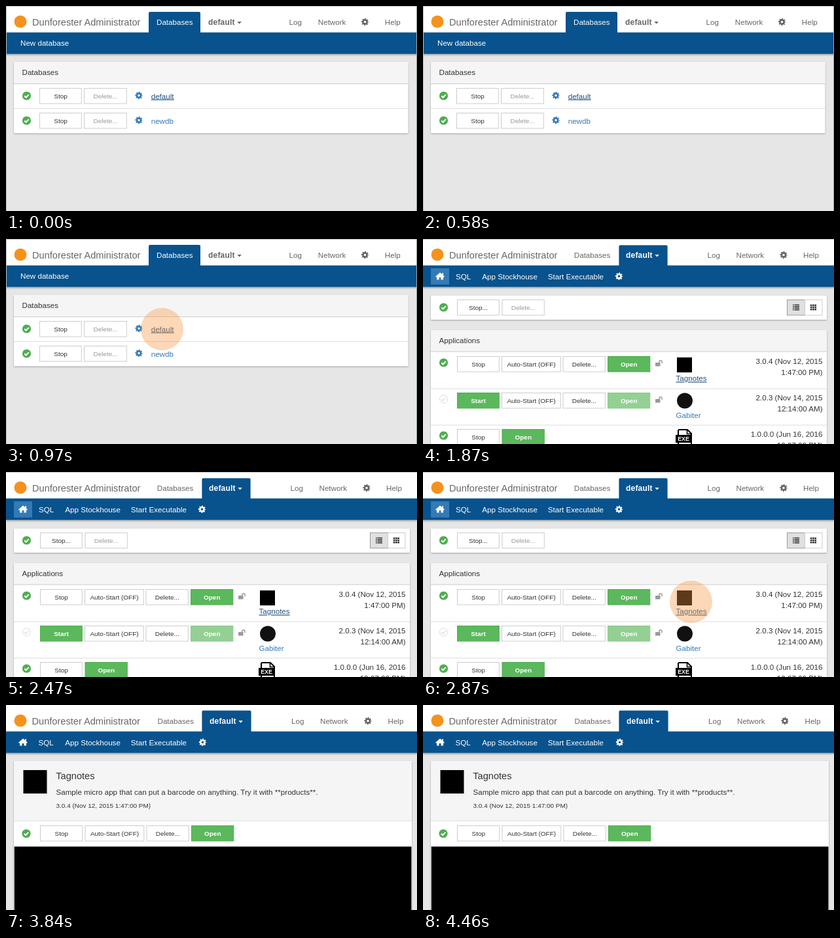
Write an HTML page that moves like this. It is 628x315 px and loops after 4.87 s.

```html
<!DOCTYPE html>
<html lang="en">
<head>
<meta charset="utf-8">
<title>Database administration</title>
<style>
html, body { margin: 0; width: 100%; height: 100%; overflow: hidden; background: #e6e6e6; }
svg { display: block; width: 628px; height: 315px; }
text { font-family: "Liberation Sans", Arial, sans-serif; font-size: 11.62px; fill: #333; white-space: pre; }
.title { font-size: 14.6px; fill: #666; }
.nav { fill: #666; }
.bold { font-size: 12px; font-weight: bold; letter-spacing: .2px; }
.white { fill: #fff; }
.small { font-size: 9.97px; }
.strong { font-weight: bold; }
.head { font-size: 14.6px; }
.link { fill: #337ab7; }
.hover { fill: #23527c; text-decoration: underline; }
.panel { filter: drop-shadow(0 1px 1px rgba(0, 0, 0, .3)); }
.bar { filter: drop-shadow(0 2px .8px rgba(0, 0, 0, .25)); }
</style>
</head>
<body>
<svg id="stage" viewBox="0 0 628 315"></svg>
<script>
const BLUE = '#08528d', GREEN = '#5cb85c', LINE = '#ddd';

const rect = (x, y, w, h, fill, extra = '') =>
  `<rect x="${x}" y="${y}" width="${w}" height="${h}" fill="${fill}" ${extra}/>`;
const circle = (x, y, r, fill, extra = '') =>
  `<circle cx="${x}" cy="${y}" r="${r}" fill="${fill}" ${extra}/>`;
const path = (d, fill, extra = '') => `<path d="${d}" fill="${fill}" ${extra}/>`;
const text = (x, y, str, cls = '', extra = '') =>
  `<text x="${x}" y="${y}" class="${cls}" ${extra}>${str}</text>`;
const panel = (x, y, w, h) => rect(x, y, w, h, '#fff', 'rx="1" class="panel"');

function gear(x, y, color) {
  const tooth = 2 * Math.PI * 4.7 / 16;
  return circle(x, y, 3.1, 'none', `stroke="${color}" stroke-width="2.6"`) +
    circle(x, y, 4.7, 'none', `stroke="${color}" stroke-width="2" stroke-dasharray="${tooth}" stroke-dashoffset="${tooth / 2}"`);
}

function check(x, y, on = true) {
  const tick = path(`M${x - 3.2} ${y + .2}l2.3 2.3l4.2 -4.4`, 'none', `stroke="${on ? '#fff' : '#ddd'}" stroke-width="${on ? 2 : 1.4}"`);
  return (on ? circle(x, y, 6.6, '#4fae50') : circle(x, y, 6, '#fff', 'stroke="#ddd"')) + tick;
}

function button(x, y, w, label, kind = '') {
  const green = kind.includes('green'), off = kind.includes('off');
  const fill = green ? GREEN : '#fff', edge = green ? '#4cae4c' : '#ccc';
  const color = green ? '#fff' : off ? '#999' : '#333';
  return rect(x + .5, y + .5, w - 1.2, 23.5, fill, `stroke="${edge}" opacity="${off && green ? .65 : 1}"`) +
    text(x + w / 2, y + 15.8, label, green ? 'small strong' : 'small', `text-anchor="middle" style="fill:${color}"`);
}

const home = (x, y) =>
  path(`M${x - 7} ${y + .6}L${x} ${y - 5.8}L${x + 3.2} ${y - 2.9}V${y - 5}H${x + 5}V${y - 1.2}L${x + 7} ${y + .6}L${x + 6} ${y + 1.6}L${x + 5} ${y + .8}V${y + 5.4}H${x + 1.5}V${y + 1.8}H${x - 1.5}V${y + 5.4}H${x - 5}V${y + .8}L${x - 6} ${y + 1.6}Z`, '#fff');

const lock = (x, y) => rect(x - 5, y - .5, 7.5, 5.5, '#999', 'rx=".6"') +
  path(`M${x + .8} ${y}V${y - 1.6}a2.1 2.1 0 0 1 4.2 0V${y + .8}`, 'none', 'stroke="#999" stroke-width="1.4"');

const caret = (x, color) => path(`M${x} 24h6.6l-3.3 3.5z`, color);

// Top bar: tab is [x, y, width], right holds the x of the right-hand items
function header(titleX, tab, dbX, defX, onDb, right) {
  const [tabX, tabY, tabW] = tab;
  const [log, net, cog, help] = right;
  return rect(0, 0, 628, 315, '#e6e6e6') + rect(0, 0, 628, 42, '#fff') +
    circle(22, 24, 9.5, '#f5921e') +
    text(titleX, 29.7, 'Dunforester Administrator', 'title') +
    rect(0, 40.6, 628, 33, BLUE, 'class="bar"') +
    path(`M${tabX} 42V${tabY + 2}q0 -2 2 -2h${tabW - 4}q2 0 2 2V42z`, BLUE) +
    text(dbX, 28.8, 'Databases', onDb ? 'white' : 'nav') +
    text(defX, 28.8, 'default', onDb ? 'bold nav' : 'bold white') +
    caret(defX + 44.3, onDb ? '#666' : '#fff') +
    text(log, 28.8, 'Log', 'nav') + text(net, 28.8, 'Network', 'nav') +
    gear(cog, 24.5, '#666') + text(help, 28.8, 'Help', 'nav');
}

const topLine = rect(0, 0, 628, 1, '#c4c4c4');

const menu = (sqlX, cogX) => home(26, 57.2) + text(sqlX, 61.6, 'SQL', 'white') +
  text(90.3, 61.6, 'App Stockhouse', 'white') +
  text(190.8, 61.6, 'Start Executable', 'white') + gear(cogX, 57.3, '#fff');

function databases() {
  const row = (y, name, cls) => check(31.5, y) + button(51, y - 12, 65, 'Stop') +
    button(119, y - 12, 66, 'Delete...', 'off') + gear(203, y - .5, '#337ab7') +
    text(221.7, y + 4.5, name, cls);
  return header(40, [218, 9, 79], 230, 309, true, [432.5, 476.8, 548.5, 578.8]) + topLine +
    text(22, 61.4, 'New database', 'white') +
    panel(12, 86, 602.5, 109.5) + rect(12, 86, 602.5, 33, '#f5f5f5') +
    rect(12, 119, 602.5, 1, '#ccc') + rect(12, 157, 602.5, 1, LINE) +
    text(24.5, 106.2, 'Databases') +
    row(138, 'default', 'hover') + row(176, 'newdb', 'link') +
    rect(0, 0, 1, 315, '#b9c2c2') + rect(627, 0, 1, 315, '#93aaa2');
}

function listToggle() {
  let out = rect(556.5, 93.5, 27, 23.5, '#e0e0e0', 'stroke="#999"') +
    rect(583.5, 93.5, 26.5, 23.5, '#fff', 'stroke="#ccc"');
  for (let i = 0; i < 4; i++) {
    const y = 100.6 + i * 2.5;
    out += rect(565, y, 1.6, 1.5, '#333') + rect(567.5, y, 7.5, 1.5, '#333');
  }
  for (let i = 0; i < 9; i++)
    out += rect(591.8 + i % 3 * 3.3, 100.6 + Math.floor(i / 3) * 3.2, 2.6, 2.5, '#333');
  return out;
}

function applications() {
  const stamp = (y, a, b) => [a, b].map((s, i) =>
    text(610.5, y + i * 16.6, s, '', 'text-anchor="end"')).join('');
  const row = (y, on) => check(31.5, y + 10, on) +
    button(52, y, 65, on ? 'Stop' : 'Start', on ? '' : 'green') +
    button(120, y, 91, 'Auto-Start (OFF)') + button(213.5, y, 65.5, 'Delete...') +
    button(282, y, 65.5, 'Open', on ? 'green' : 'green off') + lock(360, y + 10.5);
  const exe = path('M390 316V294.5q0 -1.5 1.5 -1.5H404l6 6V316', '#fff', 'stroke="#000" stroke-width="2"') +
    path('M403.5 293v6.5H410', 'none', 'stroke="#000" stroke-width="1.6"') +
    rect(386, 301, 24, 12, '#000') +
    text(398, 310.2, 'EXE', 'strong', 'text-anchor="middle" style="font-size:8.8px;fill:#fff"');
  return header(40, [299.4, 9.4, 74.2], 230.8, 310, false, [434.5, 478.5, 551, 581]) + topLine +
    rect(12, 45, 28, 25, '#337ab7') + menu(50, 299.5) +
    panel(12, 87, 605, 37) + check(31.5, 105) +
    button(52, 93, 65, 'Stop...') + button(120.5, 93, 65.5, 'Delete...', 'off') + listToggle() +
    panel(12, 140, 605, 190) + rect(12, 140, 605, 33, '#f5f5f5') +
    [172.5, 229.5, 285.5].map((y, i) => rect(12, y, 605, 1, i ? LINE : '#ccc')).join('') +
    text(24.5, 160.4, 'Applications') +
    row(180, true) + rect(388, 182, 23, 23, '#000') +
    text(386.5, 218.3, 'Tagnotes', 'hover') + stamp(192.2, '3.0.4 (Nov 12, 2015', '1:47:00 PM)') +
    row(236, false) + circle(400, 248.5, 12, '#111') +
    text(386.5, 274.5, 'Gabiter', 'link') + stamp(248.2, '2.0.3 (Nov 14, 2015', '12:14:00 AM)') +
    check(31.5, 302) + button(52, 292, 65, 'Stop') + button(120.5, 292, 65.5, 'Open', 'green') +
    exe + stamp(304.4, '1.0.0.0 (Jun 16, 2016', '10:07:00 PM)');
}

function details() {
  return header(39.5, [299.4, 8.4, 75.2], 231.5, 311, false, [436, 480, 553, 583.5]) + menu(49.5, 300.5) +
    panel(12, 86, 608, 240) + rect(12, 86, 608, 92, '#f5f5f5') + rect(12, 177.5, 608, 1, LINE) +
    rect(26.5, 100, 36, 36, '#000') +
    text(76.3, 114.2, 'Tagnotes', 'head') +
    text(76.5, 138.2, 'Sample micro app that can put a barcode on anything. Try it with **products**.') +
    text(76.5, 158.2, '3.0.4 (Nov 12, 2015 1:47:00 PM)', 'small') +
    check(31, 197.5) + button(52, 185, 65.5, 'Stop') + button(120.5, 185, 91, 'Auto-Start (OFF)') +
    button(214.5, 185, 65.5, 'Delete...') + button(283, 185, 65.5, 'Open', 'green') +
    rect(12, 217, 608, 98, LINE) + rect(12.8, 217.6, 606.6, 98, '#000');
}

const click = (x, y) => circle(x, y, 32.5, 'rgba(247,150,70,.38)');
const layers = [
  { from: 0, to: 1870, art: databases() },
  { from: 970, to: 1870, art: click(238.5, 138.5) },
  { from: 1870, to: 3840, art: applications() },
  { from: 2870, to: 3840, art: click(409.5, 199.5) },
  { from: 3840, to: 4870, art: details() }
];
const stage = document.getElementById('stage');
stage.innerHTML = layers.map(l => `<g>${l.art}</g>`).join('');

const start = performance.now();
function draw() {
  const t = (performance.now() - start) % 4870;
  layers.forEach((l, i) => {
    stage.children[i].style.display = t >= l.from && t < l.to ? '' : 'none';
  });
  requestAnimationFrame(draw);
}
draw();
</script>
</body>
</html>
```
